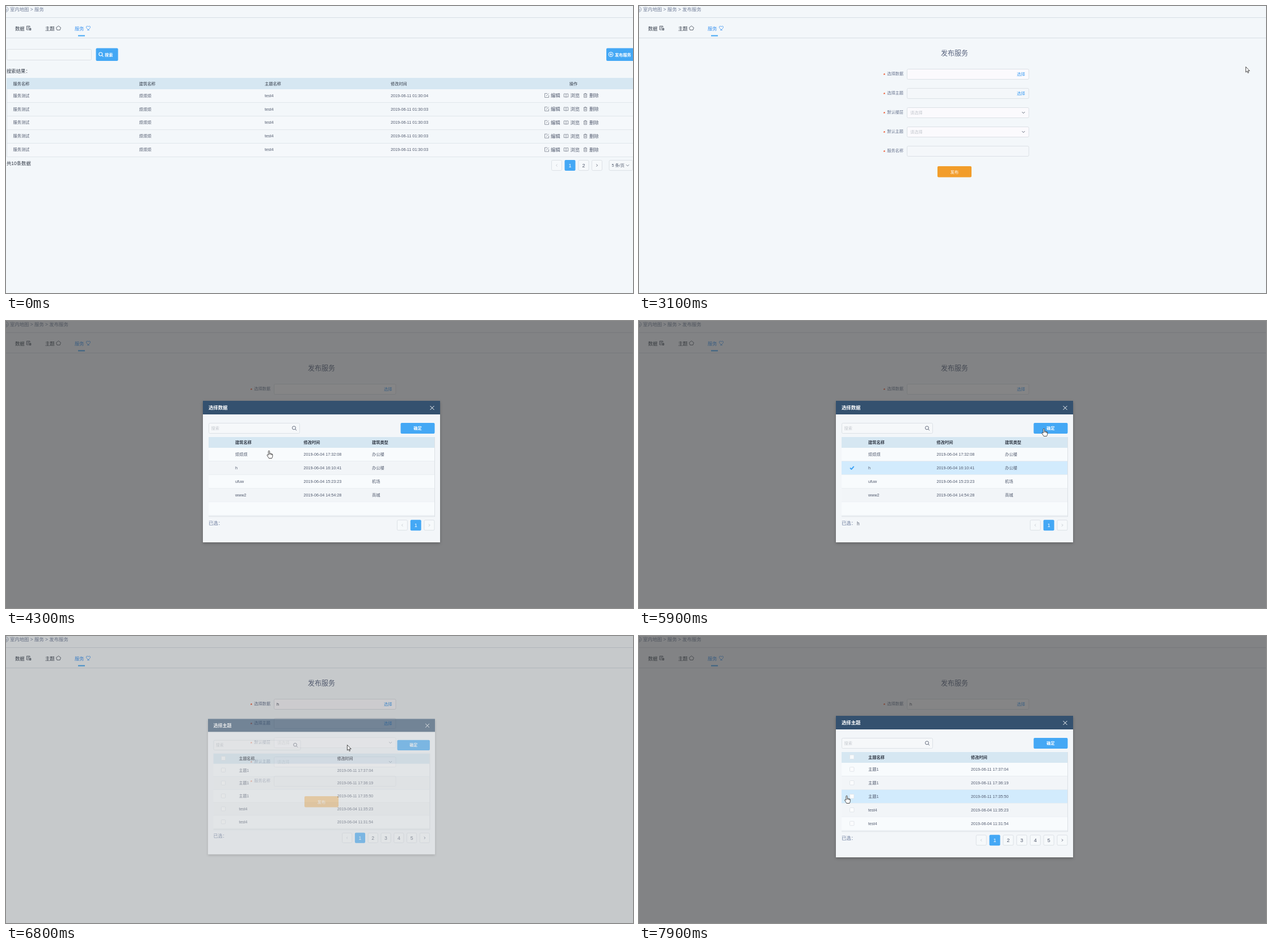
An HTML page for the animation above (8000 ms loop, 1105x507 px).

```html
<!DOCTYPE html>
<html>
<head>
<meta charset="utf-8">
<title>Publish a service</title>
<style>
  html, body { margin: 0; width: 100%; height: 100%; overflow: hidden; background: #f3f7fa; }
  svg { display: block; width: 100%; height: 100%; }
  text { font-family: 'Liberation Sans', 'Noto Sans CJK SC', 'Noto Sans CJK', sans-serif; white-space: pre; }
</style>
</head>
<body>
<svg id="stage" viewBox="0 0 1105 507"></svg>
<script>
const LOOP = 8000, STEP = 100;
const BLUE = '#44a8f5', INK = '#515a6e', DARK = '#333b48', LINE = '#dce1e6', PALE = '#c3c7cd';
const BOLD = 'font-weight="700"', MID = 'text-anchor="middle"', END = 'text-anchor="end"';

// Drawing helpers; text is placed by its vertical centre.
const text = (x, cy, s, size = 7.2, fill = INK, attrs = '') =>
  `<text x="${x}" y="${cy + size * 0.37}" font-size="${size}" fill="${fill}" ${attrs}>${s}</text>`;
const rect = (x, y, w, h, fill, attrs = '') =>
  `<rect x="${x}" y="${y}" width="${w}" height="${h}" fill="${fill}" ${attrs}/>`;
const box = (x, y, w, h, fill = '#f5f8fa', stroke = LINE) =>
  rect(x + 0.5, y + 0.5, w - 1, h - 1, fill, `rx="2" stroke="${stroke}"`);
const path = (x, y, d, stroke, width = 0.8, fill = 'none') =>
  `<path transform="translate(${x} ${y})" d="${d}" fill="${fill}" stroke="${stroke}" stroke-width="${width}" stroke-linejoin="round"/>`;
const hline = (x, y, w, color = LINE) => rect(x, y, w, 1, color);
const button = (x, y, w, h, fill) => rect(x, y, w, h, fill, 'rx="2"');
const group = (id, body, attrs = '') => `<g id="${id}" ${attrs}>${body}</g>`;

const ICON = {
  down: 'M-2.5-1.2L0 1.3L2.5-1.2',
  left: 'M1-2L-1 0L1 2',
  right: 'M-1-2L1 0L-1 2',
  search: 'M3 0A3 3 0 1 1-3 0A3 3 0 1 1 3 0M2.2 2.2L4.6 4.6',
  plus: 'M4 0A4 4 0 1 1-4 0A4 4 0 1 1 4 0M-2.3 0H2.3M0-2.3V2.3',
  close: 'M-3.5-3.5L3.5 3.5M3.5-3.5L-3.5 3.5',
  edit: 'M1-3.5H-3.5V3.5H3.5V-.5M-1 1L3.5-3.5',
  book: 'M0-2.5V3.2M0-2.5Q-2-3.5-3.7-2.8V2.8Q-2 2.2 0 3.2Q2 2.2 3.7 2.8V-2.8Q2-3.5 0-2.5',
  trash: 'M-3.2-2.3H3.2M-1.2-2.3V-3.5H1.2V-2.3M-2.4-2.3V3.5H2.4V-2.3M-.8-.5V2M.8-.5V2',
  data: 'M2-1V-3.5H-3.5V3H0M-2-1.5H1M-2 .5H0M1 3.5V.5H4V3.5ZM2.5 .5V3.5',
  theme: 'M0-3.8L4-.8L2.6 3.4H-2.6L-4-.8Z',
  service: 'M0 3L-3.3-.4Q-4.3-3.4-1.8-3.5Q-.5-3.5 0-2.2Q.5-3.5 1.8-3.5Q4.3-3.4 3.3-.4ZM-2 3.6H2',
  home: 'M4.5 0A4.5 4.5 0 1 1-4.5 0A4.5 4.5 0 1 1 4.5 0M-2.2 0L0-2L2.2 0M-1.5 0V2.2H1.5V0',
  check: 'M-3.2 0L-.9 2.4L3.4-2.6'
};

function pager(centers, cy, labels, current) {
  return centers.map((x, i) => {
    const label = labels[i], on = label === current;
    const face = on ? button(x - 9.5, cy - 9.5, 19, 19, BLUE) : box(x - 9.5, cy - 9.5, 19, 19, '#f6f9fb');
    if (label === '<') return face + path(x, cy, ICON.left, '#bcc2c9');
    if (label === '>') return face + path(x, cy, ICON.right, labels.length > 3 ? INK : '#bcc2c9', 0.9);
    return face + text(x, cy, label, 9, on ? '#fff' : INK, MID);
  }).join('');
}

function header() {
  const tabs = [[16, '数据', 40, 'data'], [69, '主题', 92.5, 'theme'], [121, '服务', 145, 'service']];
  return path(-0.5, 6, ICON.home, '#7d889f') +
    `<g id="crumbs"></g>` + hline(0, 20, 1105, '#d7dee5') + hline(0, 56, 1105, '#d7dee5') +
    tabs.map(([x, name, ix, icon], i) => {
      const color = i === 2 ? '#3b93f0' : DARK;
      return text(x, 39.5, name, 8.4, color) + path(ix, 39, ICON[icon], color, 0.75);
    }).join('') + rect(127, 51.5, 12, 2, BLUE);
}

function listPage() {
  const cols = [12.5, 234.5, 456, 678];
  const heads = ['服务名称', '建筑名称', '主题名称', '修改时间'];
  const actions = [[953, 960, 'edit', '编辑'], [987, 994.5, 'book', '浏览'], [1021, 1028, 'trash', '删除']];
  let out = box(1, 76, 150, 20) +
    button(158.5, 74.5, 39, 22.5, BLUE) + path(166.8, 85, ICON.search, '#fff', 1.1) + text(174, 86, '搜索', 7.2, '#fff', BOLD) +
    button(1058, 74.5, 50, 22.5, BLUE) + path(1066, 85.5, ICON.plus, '#fff', 1) + text(1073, 86, '发布服务', 7.2, '#fff', BOLD) +
    text(1, 114.5, '搜索结果：', 8.4, DARK) +
    rect(1, 127, 1104, 20, '#d6e7f2') +
    heads.map((s, i) => text(cols[i], 137, s, 7.2, DARK, 'font-weight="500"')).join('') +
    text(1000, 137, '操作', 7.2, DARK, MID + ' font-weight="500"');
  for (let i = 0; i < 5; i++) {
    const cy = 158 + i * 23.9;
    const cells = ['服务测试', '烦烦烦', 'test4', '2019-06-11 01:30:0' + (i ? 3 : 4)];
    out += rect(1, Math.round(cy - 11), 1104, 24, i % 2 ? '#f3f7fa' : '#f5f8fb') +
      cells.map((s, c) => text(cols[c], cy, s)).join('') +
      actions.map(([ix, x, icon, s]) => path(ix, cy, ICON[icon], '#6b7280', 0.7) + text(x, cy, s, 8.4)).join('') +
      hline(1, Math.round(cy + 12), 1104, '#e0e6eb');
  }
  return out + rect(1, 147, 1, 119, LINE) + text(1, 278, '共10条数据', 8.4, DARK) +
    pager([970.5, 994, 1018, 1041.5], 281.5, ['<', '1', '2', '>'], '1') +
    box(1062.5, 272, 42.5, 19) + text(1067.5, 281.5, '5 条/页') + path(1095.5, 281.5, ICON.down, INK);
}

function formPage() {
  const labels = ['选择数据', '选择主题', '默认楼层', '默认主题', '服务名称'];
  return text(556, 83.5, '发布服务', 12, '#58637d', MID) +
    labels.map((label, i) => {
      const cy = 120 + i * 34;
      const field = i < 2 ? text(666, cy, '选择', 7.2, '#3b9bf3')
        : i < 4 ? text(478, cy + 0.5, '请选择', 7.2, PALE) + path(677.5, cy + 0.3, ICON.down, INK, 0.9) : '';
      return text(430.8, cy + 1.5, '*', 8, '#ed4014', BOLD) + text(466, cy - 0.3, label, 7.2, '#68748f', END) +
        box(472, cy - 9, 215.5, 19, i % 4 && i !== 2 && i !== 3 || i === 4 ? '#f4f7fa' : '#fbfafd') + field;
    }).join('') +
    group('picked', text(477, 120.5, 'h', 7.2, DARK)) +
    button(526, 283, 60, 19.5, '#f29d2a') + text(556, 293, '发布', 7.2, '#fff', MID);
}

function dialog(id, title, cols, heads, rows, pages, checkboxes) {
  const tick = (cy, fill) => rect(371.5, cy - 4, 7.5, 7.5, fill, `rx="1" stroke="${LINE}" stroke-width=".8"`);
  let out = rect(347, 141, 418, 250, '#f3f6f9', 'filter="url(#shadow)"') + rect(347, 141, 418, 24, '#34516f') +
    text(357, 153, title, 8.4, '#fff', BOLD) + path(751, 153.5, ICON.close, '#fff', 1) +
    box(357, 180, 161, 19, '#f6f8fa') + text(361.5, 189.5, '搜索', 7.2, PALE) + path(507.5, 188.8, ICON.search, INK, 0.9) +
    button(695.5, 180, 60, 19, BLUE) + text(725.5, 189, '确定', 7.2, '#fff', MID + ' ' + BOLD) +
    rect(357, 205, 398, 19, '#d6e7f2') +
    heads.map((s, i) => text(cols[i], 214, s, 7.2, DARK, BOLD)).join('') + (checkboxes ? tick(214, '#f7fafc') : '');
  for (let i = 0; i < 5; i++) {
    const y = 224 + i * 23.9, cy = y + 11.7;
    out += rect(357, y, 398, 24, i % 2 ? '#f2f5f8' : '#f8fbfd', 'class="row"') + hline(357, Math.round(y + 23), 398, '#e6ebef') +
      (rows[i] || []).map((s, c) => text(cols[c], cy, s)).join('') + (checkboxes ? tick(cy, '#fbfcfd') : '');
  }
  out += hline(357, 345, 398) + rect(755, 205, 1, 141, LINE) + text(357, 357, '已选：', 8.4, '#66779a') +
    pager(pages.map((_, i) => 746 - (pages.length - 1 - i) * 23.8), 360.7, pages, '1');
  if (!checkboxes) out += group('tick', path(375.3, 259.5, ICON.check, '#38a0f5', 1.9) + text(384, 357.5, 'h', 8.4, INK));
  return group(id, out);
}

const stage = document.getElementById('stage');
stage.innerHTML =
  `<defs><filter id="shadow" x="-5%" y="-5%" width="110%" height="112%"><feDropShadow dx="0" dy="2" stdDeviation="2.5" flood-opacity=".25"/></filter></defs>` +
  rect(0, 0, 1105, 507, '#f3f7fa') + header() + group('list', listPage()) + group('form', formPage()) +
  rect(0, 0, 1105, 507, '#373737', 'id="mask"') +
  dialog('dataDialog', '选择数据', [404, 524.5, 645], ['建筑名称', '修改时间', '建筑类型'], [
    ['烦烦烦', '2019-06-04 17:32:08', '办公楼'], ['h', '2019-06-04 16:10:41', '办公楼'],
    ['ufuw', '2019-06-04 15:23:23', '机场'], ['www2', '2019-06-04 14:54:28', '商城']
  ], ['<', '1', '>']) +
  dialog('themeDialog', '选择主题', [404, 585], ['主题名称', '修改时间'], [
    ['主题1', '2019-06-11 17:37:04'], ['主题1', '2019-06-11 17:36:19'], ['主题1', '2019-06-11 17:35:50'],
    ['test4', '2019-06-04 11:35:23'], ['test4', '2019-06-04 11:31:54']
  ], ['<', '1', '2', '3', '4', '5', '>'], true) +
  group('arrow', path(0, 0, 'M.4.4V10L2.6 8L4.1 11.4L5.6 10.7L4.1 7.5H7.2Z', '#222', 0.8, '#fff')) +
  group('hand', path(0, 0, 'M-1.1 8V1.2Q-1.1.2 0 .2T1.1 1.2V5Q2.7 4.2 3.3 5.4Q4.6 4.9 5 6Q6.3 5.7 6.3 7.2V9.8Q6.2 11.5 5 13.5H-.2Q-1.2 11.6-3.3 8.6Q-3.6 7-2.2 7.2ZM1.1 5V7.3M3.3 5.4V7.5M5 6V7.8', '#222', 0.8, '#fff'));

// Pointer path: time, x, y, shape held until the next key.
const POINTER = [
  [0, 1079, 57, ''], [200, 1079, 57, 'arrow'], [400, 960, 34, 'arrow'], [600, 600, 28, 'arrow'],
  [800, 300, 34, 'arrow'], [1000, 174, 40, 'arrow'], [1100, 148, 40, 'hand'], [1200, 131, 40, 'hand'],
  [1300, 131, 40, 'hand'], [1400, 165, 46, 'arrow'], [1500, 370, 74, 'arrow'], [1600, 370, 74, ''],
  [2100, 1085, 53, 'arrow'], [2300, 1052, 72, 'arrow'], [2400, 1060, 80, 'hand'], [2500, 1066, 85, 'hand'],
  [2700, 1066, 85, 'arrow'], [2900, 1068, 95, 'arrow'], [3000, 1068, 95, 'arrow'], [3100, 1069, 107, 'arrow'],
  [3500, 860, 153, 'arrow'], [3800, 690, 122, 'arrow'], [3900, 673, 117, 'hand'], [4000, 673, 117, 'hand'],
  [4100, 660, 125, 'arrow'], [4200, 560, 180, 'arrow'], [4300, 463.5, 229, 'hand'], [4500, 407, 266, 'hand'],
  [4800, 407, 266, 'hand'], [5300, 560, 222, 'arrow'], [5600, 698, 177, 'hand'], [5700, 704, 184, 'hand'],
  [5800, 713.5, 190, 'hand'], [5900, 713.5, 190, 'hand'], [6000, 705, 172, 'arrow'], [6100, 695, 155, 'arrow'],
  [6400, 673, 151, 'hand'], [6600, 673, 151, 'hand'], [6700, 650, 165, 'arrow'], [6800, 601, 192, 'arrow'],
  [7200, 560, 197, 'arrow'], [7300, 560, 197, 'arrow'], [7400, 530, 205, 'arrow'], [7500, 480, 232, 'hand'],
  [7700, 400, 289, 'hand'], [7900, 366, 282, 'hand'], [8000, 366, 282, 'hand']
];
// Dialog fades: time, dialog strength, mask strength.
const DATA_FADE = [[0, 0, 0], [4000, 0, 0], [4100, 0.25, 0.2], [4200, 0.8, 0.6], [4300, 1, 1], [5900, 1, 1],
  [6000, 0.6, 0.8], [6100, 0.18, 0.46], [6200, 0.02, 0.13], [6300, 0, 0], [8000, 0, 0]];
const THEME_FADE = [[0, 0, 0], [6600, 0, 0], [6700, 0.15, 0.08], [6800, 0.57, 0.4], [6900, 0.9, 0.73], [7000, 1, 1], [8000, 1, 1]];

function sample(keys, t) {
  let i = 0;
  while (i < keys.length - 2 && keys[i + 1][0] <= t) i++;
  const a = keys[i], b = keys[i + 1], k = Math.max(0, (t - a[0]) / (b[0] - a[0]));
  return [a[1] + (b[1] - a[1]) * k, a[2] + (b[2] - a[2]) * k, a[3]];
}

const $ = id => document.getElementById(id);
const show = (id, on) => $(id).setAttribute('visibility', on ? 'inherit' : 'hidden');

function fade(id, amount, hovered) {
  const node = $(id), scale = 0.9 + 0.1 * amount;
  node.setAttribute('opacity', amount);
  node.setAttribute('visibility', amount ? 'visible' : 'hidden');
  node.setAttribute('transform', `translate(556 266) scale(${scale}) translate(-556 -266)`);
  node.querySelectorAll('.row').forEach((row, i) => { row.style.fill = hovered(i) ? '#d2ebfd' : ''; });
}

function render(t) {
  const onForm = t >= 2700, picked = t >= 4700;
  $('crumbs').innerHTML = text(7, 6, '室内地图 &gt; 服务' + (onForm ? ' &gt; 发布服务' : ''), 8.4, '#75819b');
  show('list', !onForm);
  show('form', onForm);
  show('picked', t >= 6000);
  show('tick', picked);

  // The row highlight trails the pointer by one step.
  const [, hy, hshape] = sample(POINTER, Math.max(0, t - STEP));
  const hoverRow = hshape === 'hand' ? Math.floor((hy - 224) / 24) : -1;
  const [data, dataMask] = sample(DATA_FADE, t), [theme, themeMask] = sample(THEME_FADE, t);
  fade('dataDialog', data, i => (data === 1 && i === hoverRow) || (picked && i === 1));
  fade('themeDialog', theme, i => theme === 1 && i === hoverRow);
  $('mask').setAttribute('opacity', 0.6 * Math.max(dataMask, themeMask));

  const [x, y, shape] = sample(POINTER, t);
  for (const id of ['arrow', 'hand']) {
    show(id, shape === id);
    $(id).setAttribute('transform', `translate(${x} ${y})`);
  }
}

const start = performance.now();
function tick(now) {
  const t = Math.max(0, now - start) % LOOP;
  render(Math.floor(t / STEP) * STEP);
  requestAnimationFrame(tick);
}
render(0);
requestAnimationFrame(tick);
</script>
</body>
</html>
```
